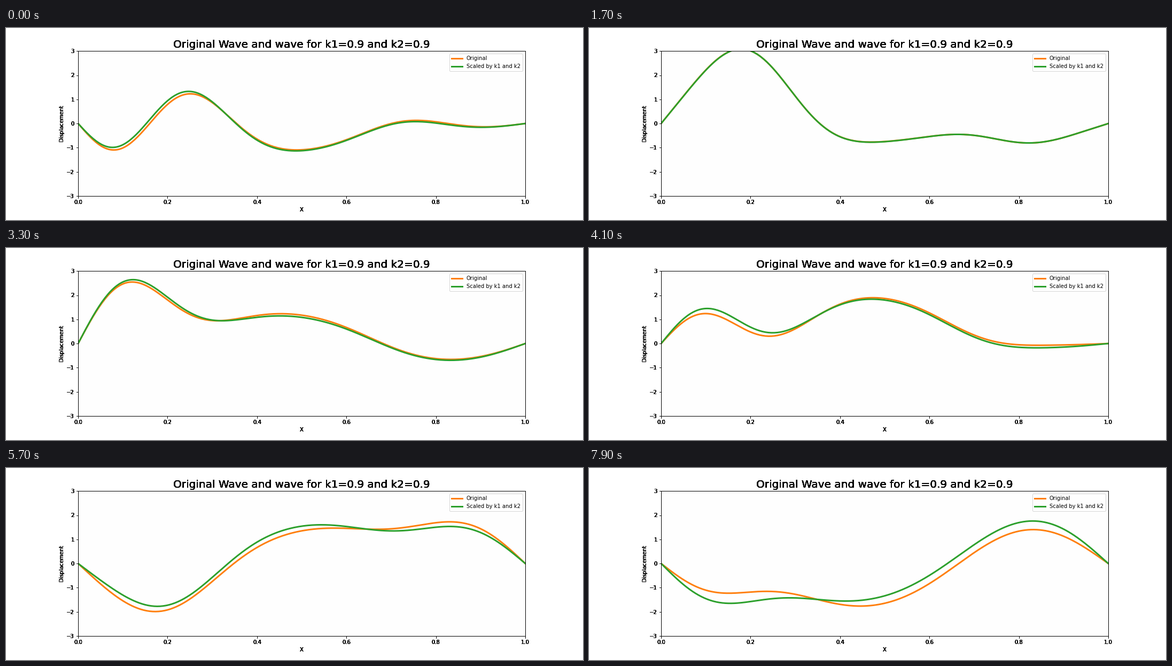
These frames come from a looping animation (1080 by 360 pixels, 8000 ms). A matplotlib script:

```python
import numpy as np
import matplotlib.pyplot as plt
from matplotlib.animation import FuncAnimation

FRAMES, STEP_MS = 80, 100
BOX = [0.125, 0.125, 0.775, 0.755]

DRIVE = 0.75   # common slow frequency, rad/s
FADE = 5.0     # time scale on which the start-up swing dies away, s

# One row per string mode: steady amplitude, its zero crossing (s),
# start-up amplitude, frequency and zero crossing (s)
MODES = np.array([
    [-1.15, 6.80, -0.95, 0.45, 4.89],
    [-2.20, 4.50, -1.05, 0.80, 0.93],
    [0.82, 6.55, 1.05, 0.65, 0.60],
    [-0.65, 4.45, 0.28, 0.75, 0.30],
    [-0.14, 6.70, 0.60, 0.70, 1.35],
    [-0.08, 4.90, 0.35, 0.90, 2.30],
    [-0.04, 6.85, 0.20, 0.80, 2.20],
    [0.00, 0.00, 0.12, 0.90, 2.70],
])

x = np.linspace(0, 1, 301)
shapes = np.sin(np.pi * np.outer(x, np.arange(1, len(MODES) + 1)))


def wave(t):
    """Displacement of the string: steady motion plus a fading swing."""
    amp, zero, swing, freq, start = MODES.T
    steady = amp * np.sin(DRIVE * (t - zero))
    fading = swing * np.sin(freq * (t - start)) * np.exp(-(t / FADE)**2)
    return shapes @ (steady + fading)


def scaled_wave(t):
    """The same motion on a slightly slower clock with a small head start."""
    return wave(0.955 * t + 0.07)


def dress(ax):
    ax.set(xlim=(0, 1), ylim=(-3, 3), xlabel="X", ylabel="Displacement")
    ax.set_xticks(np.arange(6) / 5)
    ax.set_yticks(range(-3, 4))
    ax.set_title("Original Wave and wave for k1=0.9 and k2=0.9", fontsize=20)


plt.rcParams["font.family"] = "DejaVu Sans"
fig = plt.figure(figsize=(15, 5), dpi=72, facecolor="white")
ax = fig.add_axes(BOX, facecolor="#fefefe")
dress(ax)
base, = ax.plot(x, wave(0), color="#ff7f0e", lw=3, label="Original")
scaled, = ax.plot(x, scaled_wave(0), color="#2ca02c", lw=3,
                  label="Scaled by k1 and k2")
ax.legend(loc="best")

# Repeated frames and labels give the heavy, hard-edged lettering
for i in range(6):
    over = fig.add_axes(BOX, label=f"over{i}")
    over.patch.set_visible(False)
    dress(over)


def draw(frame):
    t = frame * STEP_MS / 1000
    base.set_ydata(wave(t))
    scaled.set_ydata(scaled_wave(t))
    return base, scaled


anim = FuncAnimation(fig, draw, frames=FRAMES, interval=STEP_MS, repeat=True)
plt.show()
```
